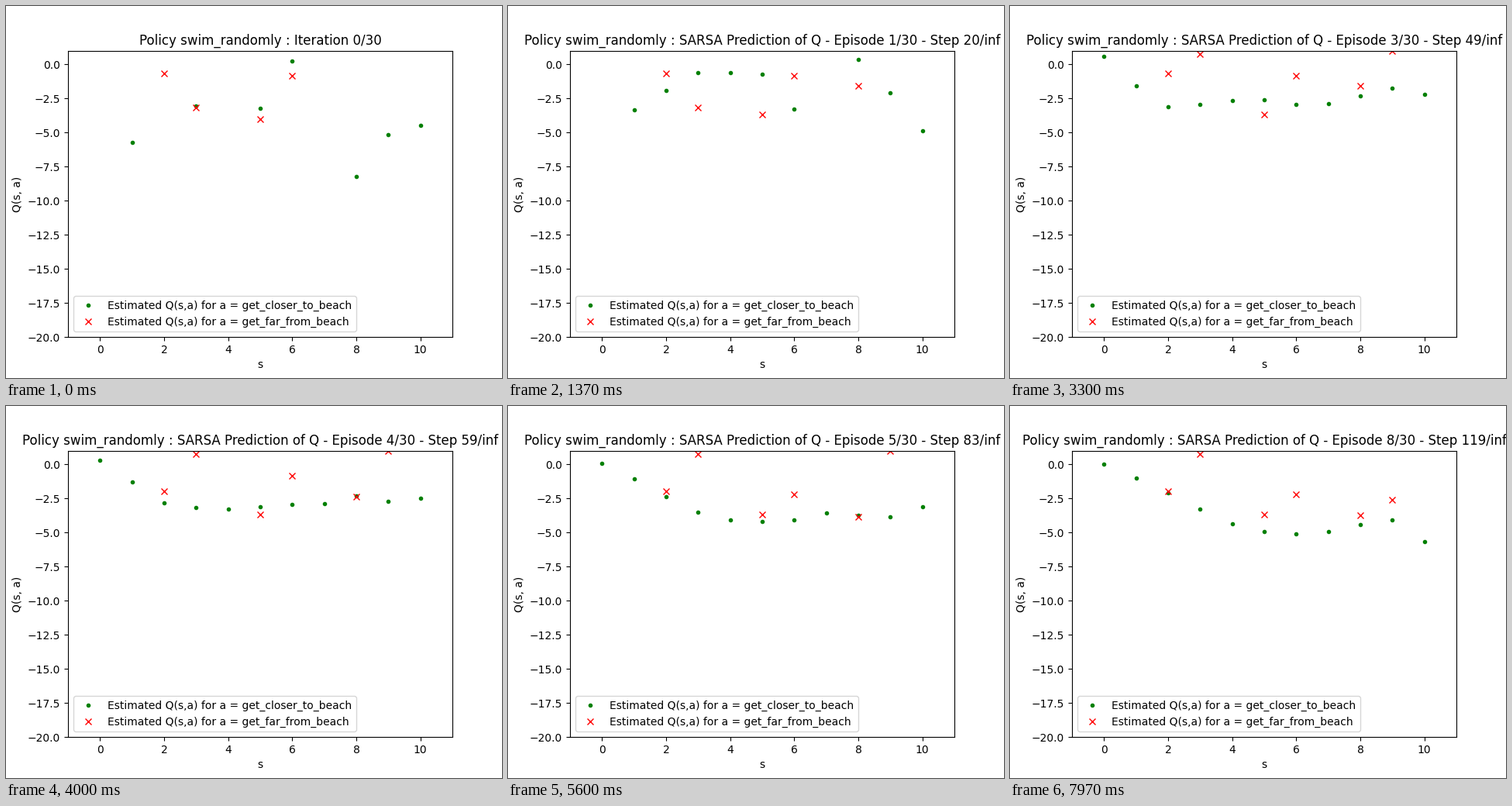
Recreate the animation shown at these times as a matplotlib script. Size 640 by 480 pixels, loop 8 s.

```python
import matplotlib.pyplot as plt
import numpy as np
from matplotlib.animation import FuncAnimation

FRAMES = 240
LOOP_MS = 8000
ALPHA, GAMMA, REWARD = .5, .99, -1
START = 10                 # distance from the beach at the start of an episode
CLOSER, FAR = 0, 1

# First guess of Q(s, a) for s = 0..10, one row per action
Q_START = np.array([
    [4.8, -5.73, 2.87, -3.06, 2.80, -3.23, .24, 3.08, -8.23, -5.16, -4.48],
    [3.0, 3.0, -.67, -3.17, 5.73, -4.02, -.84, 6.60, 6.00, 3.90, 9.0],
])

# States where the swimmer turns away from the beach, in order, per episode
AWAY = [[8, 7, 8, 5], [], [9, 3, 4], [2], [8], [8, 8, 6], [8], [10, 10, 7], [8, 9, 8]]


def walk(turns):
    """The (state, action) pairs of one episode, until the beach is reached."""
    turns, s = list(turns), START
    while s > 0:
        if turns and turns[0] == s:
            turns.pop(0)
            yield s, FAR
            s = min(s + 1, START)
        else:
            yield s, CLOSER
            s -= 1


def sarsa():
    """The episode of each step, and Q before the first and after each step."""
    q, episodes, tables = Q_START.copy(), [], [Q_START.copy()]
    for episode, turns in enumerate(AWAY):
        path = list(walk(turns))
        for (s, a), after in zip(path, path[1:] + [None]):
            if after is None:
                future = 0
                q[CLOSER, 0] *= 1 - ALPHA
            else:
                future = q[after[1], after[0]]
            q[a, s] += ALPHA * (REWARD + GAMMA * future - q[a, s])
            episodes.append(episode)
            tables.append(q.copy())
    return episodes, tables


episodes, tables = sarsa()
states = np.arange(START + 1)

fig, ax = plt.subplots(figsize=(6.4, 4.8), dpi=100)
closer_line, = ax.plot(states, Q_START[CLOSER], "g.",
                       label="Estimated Q(s,a) for a = get_closer_to_beach")
far_line, = ax.plot(states, Q_START[FAR], "rx",
                    label="Estimated Q(s,a) for a = get_far_from_beach")
ax.set_xlim(-1, 11)
ax.set_ylim(-20, 1)
ax.set_xlabel("s")
ax.set_ylabel("Q(s, a)")
ax.legend(loc="lower left")
title = ax.set_title("")


def draw(frame):
    # Each step shows its title first, then its update
    if frame == 0:
        text = "Iteration 0/30"
    else:
        step = (frame - 1) // 2
        text = f"SARSA Prediction of Q - Episode {episodes[step]}/30 - Step {step}/inf"
    title.set_text("Policy swim_randomly : " + text)
    q = tables[frame // 2]
    closer_line.set_ydata(q[CLOSER])
    far_line.set_ydata(q[FAR])
    return closer_line, far_line, title


anim = FuncAnimation(fig, draw, frames=FRAMES, interval=LOOP_MS / FRAMES,
                     init_func=lambda: draw(0), repeat=True, repeat_delay=0)
plt.show()
```
